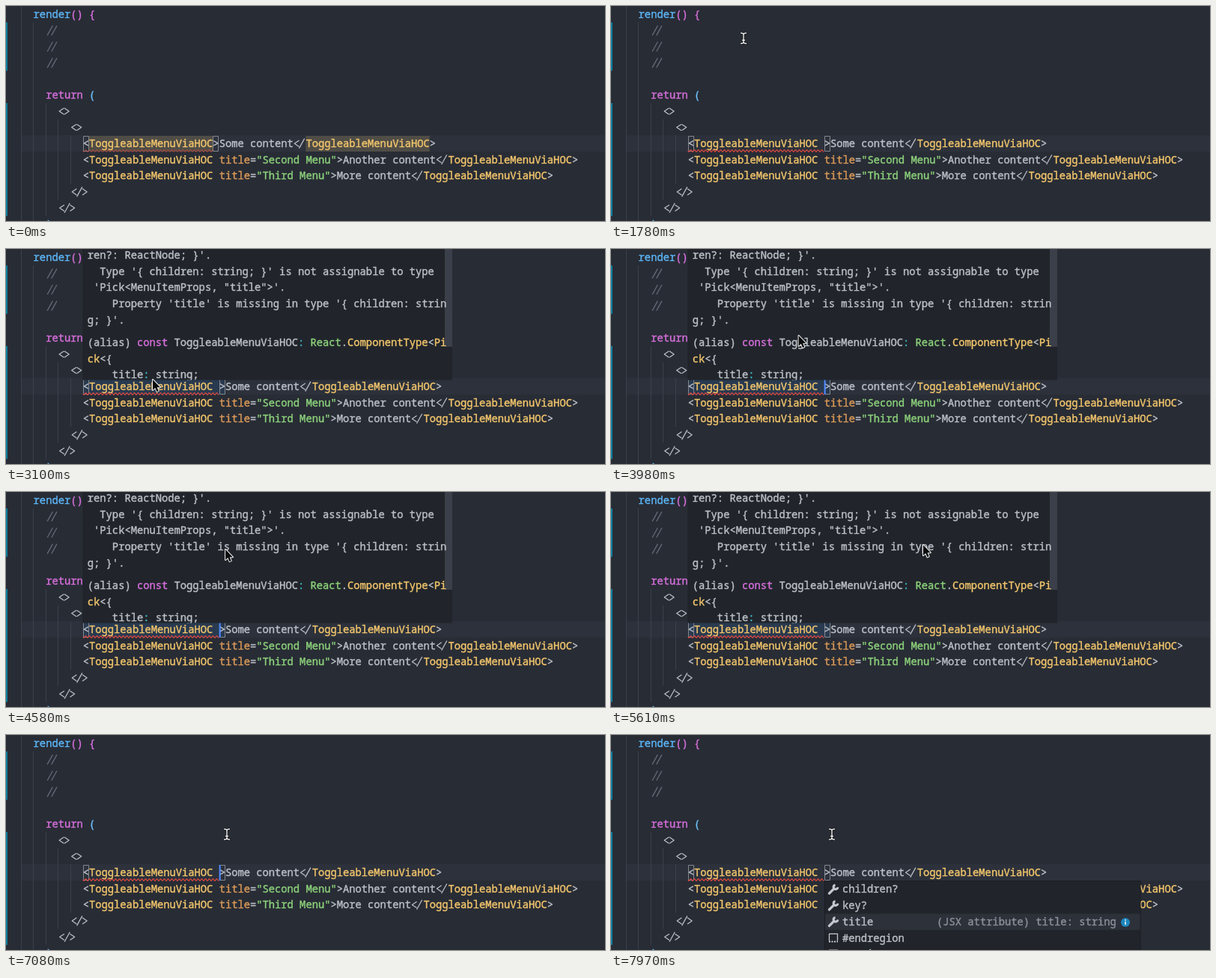
An HTML page with a canvas that plays this animation: 800x288 px, repeating every 8 s.

```html
<!DOCTYPE html>
<html lang="en">
<head>
<meta charset="utf-8">
<title>Editor</title>
<style>
html, body { margin: 0; width: 100%; height: 100%; overflow: hidden; background: #282c35; }
canvas { display: block; }
</style>
</head>
<body>
<canvas id="stage" width="800" height="288"></canvas>
<script>
const ctx = document.getElementById('stage').getContext('2d');
const LOOP = 8000;
const CHAR = 8.268, LINE = 21.6, LEFT = 36.6;
const FONT = '13.8px "Noto Sans Mono", "DejaVu Sans Mono", monospace';
const C = {
  bg: '#282c35', panel: '#21252b', row: '#2c313b', guide: '#3b404a', gutter: '#0c7d9d',
  plain: '#bcc0c8', tag: '#f3c66c', attr: '#db9a58', str: '#8cd27b', key: '#d66fdc',
  fn: '#5cb5f6', paren: '#6cc0f8', op: '#3bbac8', note: '#656c79', dim: '#8b9099', red: '#e8483e'
};
const NAME = 'ToggleableMenuViaHOC';
// Joined glyphs, drawn as strokes: left edge of each part within the group
const LIGATURES = { '</>': [2, 8, 15.8], '</': [1.4, 7.2], '<>': [1.5, 8.3], '//': [1.6, 7.2] };
const STROKES = {
  '<': [[6.2, -9], [0, -4.8], [6.2, -0.6]],
  '>': [[0, -9], [6.2, -4.8], [0, -0.6]],
  '/': [[0.4, 1.6], [7.6, -11.4]]
};

const times = { typed: 140, mouse: 1780, tipOn: 2510, tipOff: 6490, list: 7820 };
// Times at which the caret switches on and off in turn
const blinks = [140, 590, 1180, 1780, 2510, 3100, 3690, 4130, 4580, 5310, 5900, 6490, 7080, 7680];
// Mouse path: time, x, y
const path = [
  [1780, 177, 43], [1930, 181, 78], [2070, 191, 148], [2220, 196, 175], [3100, 196, 175],
  [3690, 230, 135], [4580, 293, 77], [5610, 417, 71], [5900, 410, 85],
  [6400, 350, 196], [6750, 310, 150], [7080, 295, 133]
];

const col = c => LEFT + c * CHAR;
const rowTop = r => 0.4 + r * LINE;
const base = r => 16.2 + r * LINE;

function rect(x, y, w, h, color) {
  ctx.fillStyle = color;
  ctx.fillRect(x, y, w, h);
}

function line(points, x = 0, y = 0) {
  ctx.beginPath();
  points.forEach(([px, py]) => ctx.lineTo(x + px, y + py));
  ctx.stroke();
}

// parts: colour, string, colour, string ...
function text(x, y, ...parts) {
  ctx.font = FONT;
  ctx.lineJoin = 'round';
  ctx.lineCap = 'butt';
  for (let p = 0; p < parts.length; p += 2) {
    const s = parts[p + 1];
    ctx.fillStyle = ctx.strokeStyle = C[parts[p]];
    for (let i = 0; i < s.length;) {
      const lig = Object.keys(LIGATURES).find(k => s.startsWith(k, i));
      if (lig) {
        ctx.lineWidth = 1.25;
        LIGATURES[lig].forEach((dx, n) => line(STROKES[lig[n]], x + dx, y));
      } else {
        // A hairline outline gives the medium weight
        ctx.lineWidth = 0.4;
        ctx.fillText(s[i], x, y);
        ctx.strokeText(s[i], x, y);
      }
      const n = lig ? lig.length : 1;
      i += n;
      x += n * CHAR;
    }
  }
}

const code = (r, c, ...parts) => text(col(c), base(r), ...parts);

function item(r, title, content) {
  code(r, 8, 'plain', '<', 'tag', NAME, 'attr', ' title', 'plain', '=', 'str', `"${title}"`,
    'plain', `>${content}</`, 'tag', NAME, 'plain', '>');
}

function guides() {
  rect(0, rowTop(1), 2, 3 * LINE, C.gutter);
  rect(0, rowTop(6), 2, 7 * LINE, C.gutter);
  [[20, 0, 14], [36, 1, 14], [53, 6, 13], [69, 7, 12], [86, 8, 11]].forEach(([x, a, b]) =>
    rect(x, rowTop(a), 1, (b - a) * LINE, C.guide));
}

function squiggle(x0, x1, y) {
  ctx.beginPath();
  for (let x = x0; x <= x1; x += 0.5) ctx.lineTo(x, y + 1.3 * Math.sin((x - x0) * Math.PI / 2.5));
  ctx.strokeStyle = C.red;
  ctx.lineWidth = 1.1;
  ctx.stroke();
}

function bracketBox(c) {
  ctx.strokeStyle = '#83868c';
  ctx.lineWidth = 1;
  ctx.strokeRect(Math.round(col(c)) + 0.5, 174.5, 7, 20);
}

function activeLine(t, tip) {
  const typed = t >= times.typed;
  const end = typed ? 30 : 29;
  rect(20, 173, 780, 22, C.row);
  guides();
  if (!typed) {
    rect(col(9), 174, 20 * CHAR, 21, '#504d47');
    rect(col(44), 174, 20 * CHAR, 21, '#504d47');
  }
  if (tip) rect(col(8), 174, 23 * CHAR, 21, '#293a50');
  bracketBox(8);
  bracketBox(end);
  ctx.globalAlpha = typed ? 1 : 0.55;
  squiggle(col(8), col(end), 194);
  ctx.globalAlpha = 1;
  code(8, 8, 'plain', '<', 'tag', NAME, 'plain', (typed ? ' ' : '') + '>Some content</',
    'tag', NAME, 'plain', '>');
  if (blinks.filter(b => b <= t).length % 2) rect(col(30), 174, 2, 21, '#528bff');
}

function editor(t, tip) {
  rect(0, 0, 800, 288, C.bg);
  activeLine(t, tip);
  code(0, 0, 'fn', 'render', 'key', '() {');
  for (let r = 1; r < 4; r++) code(r, 2, 'note', '//');
  code(5, 2, 'key', 'return ', 'paren', '(');
  code(6, 4, 'plain', '<>');
  code(7, 6, 'plain', '<>');
  item(9, 'Second Menu', 'Another content');
  item(10, 'Third Menu', 'More content');
  code(11, 6, 'plain', '</>');
  code(12, 4, 'plain', '</>');
  code(13, 2, 'paren', ')');
}

function tooltip() {
  ctx.save();
  ctx.beginPath();
  ctx.rect(102, 0, 494, 175.5);
  ctx.clip();
  rect(102, 0, 494, 176, C.panel);
  rect(586, 0, 10, 131, '#3a3f49');
  const x = 108.8;
  [
    "ren?: ReactNode; }'.",
    "  Type '{ children: string; }' is not assignable to type",
    " 'Pick<MenuItemProps, \"title\">'.",
    "    Property 'title' is missing in type '{ children: strin",
    "g; }'."
  ].forEach((s, i) => text(x, 13.2 + i * LINE, 'plain', s));
  text(x, 130, 'plain', '(alias) ', 'key', 'const', 'plain', ` ${NAME}`, 'op', ':',
    'str', ' React', 'plain', '.', 'tag', 'ComponentType', 'plain', '<', 'tag', 'Pi');
  text(x, 130 + LINE, 'tag', 'ck', 'plain', '<{');
  text(x, 130 + 2 * LINE, 'plain', '    title', 'op', ':', 'plain', ' string;');
  ctx.restore();
}

function wrench(y) {
  ctx.strokeStyle = '#c5c8ce';
  ctx.lineCap = 'round';
  ctx.lineWidth = 3.4;
  line([[291.5, 5.5], [298, -1]], 0, y);
  ctx.lineWidth = 3;
  ctx.lineCap = 'butt';
  ctx.beginPath();
  ctx.arc(300, y - 2.8, 2.9, 0.05, Math.PI * 1.45);
  ctx.stroke();
}

function snippet(y) {
  ctx.strokeStyle = '#c5c8ce';
  ctx.lineWidth = 1.3;
  line([[291.5, 4], [291.5, -5.5], [302.5, -5.5], [302.5, 4]], 0, y);
  ctx.setLineDash([2, 1.5]);
  ctx.lineWidth = 2;
  line([[291, 5], [303, 5]], 0, y);
  ctx.setLineDash([]);
}

function suggestions() {
  rect(285, 195, 422.5, 93, '#1a1d22');
  rect(286, 196, 420.5, 92, C.panel);
  rect(286, 239.5, 420.5, 21.7, '#2c313a');
  ['children?', 'key?', 'title', '#endregion', '#region'].forEach((s, i) => {
    const y = 206.6 + i * 21.75;
    text(309, y + 4.8, 'plain', s);
    if (i < 3) wrench(y); else snippet(y);
  });
  text(435, 254.9, 'dim', '(JSX attribute) title: string');
  ctx.fillStyle = '#1c86bd';
  ctx.beginPath();
  ctx.arc(687, 251, 6, 0, 7);
  ctx.fill();
  rect(686.2, 247, 1.7, 1.7, '#dfeaf2');
  rect(686.2, 249.8, 1.7, 4.4, '#dfeaf2');
}

function mouseAt(t) {
  const i = path.findIndex(p => p[0] > t);
  if (i < 0) return path[path.length - 1].slice(1);
  const [t0, x0, y0] = path[i - 1], [t1, x1, y1] = path[i];
  const k = (t - t0) / (t1 - t0);
  return [x0 + (x1 - x0) * k, y0 + (y1 - y0) * k];
}

function arrow(x, y) {
  ctx.save();
  ctx.translate(x, y);
  ctx.beginPath();
  [[0, 0], [0, 14], [3.2, 11], [5.5, 16.2], [7.7, 15.2], [5.6, 10.2], [9.8, 10.2]]
    .forEach(p => ctx.lineTo(...p));
  ctx.closePath();
  ctx.lineJoin = 'round';
  ctx.lineWidth = 2;
  ctx.strokeStyle = '#f2f2f2';
  ctx.stroke();
  ctx.fillStyle = '#0b0c0e';
  ctx.fill();
  ctx.restore();
}

function beam(x, y) {
  ctx.save();
  ctx.translate(x, y);
  ctx.lineCap = 'round';
  for (const [w, color] of [[3, '#15171b'], [1.4, '#eeeeee']]) {
    ctx.lineWidth = w;
    ctx.strokeStyle = color;
    ctx.beginPath();
    ctx.moveTo(-3.5, -7);
    ctx.quadraticCurveTo(0, -7, 0, -5);
    ctx.quadraticCurveTo(0, -7, 3.5, -7);
    ctx.moveTo(0, -5);
    ctx.lineTo(0, 5);
    ctx.moveTo(-3.5, 7);
    ctx.quadraticCurveTo(0, 7, 0, 5);
    ctx.quadraticCurveTo(0, 7, 3.5, 7);
    ctx.moveTo(-1.5, 2.5);
    ctx.lineTo(1.5, 2.5);
    ctx.stroke();
  }
  ctx.restore();
}

function draw(t) {
  const tip = t >= times.tipOn && t < times.tipOff;
  editor(t, tip);
  if (tip) tooltip();
  if (t >= times.list) suggestions();
  if (t >= times.mouse) {
    const [x, y] = mouseAt(t);
    (tip && y < 176 ? arrow : beam)(x, y);
  }
}

const start = performance.now();
function tick() {
  draw((performance.now() - start) % LOOP);
  requestAnimationFrame(tick);
}
tick();
</script>
</body>
</html>
```
